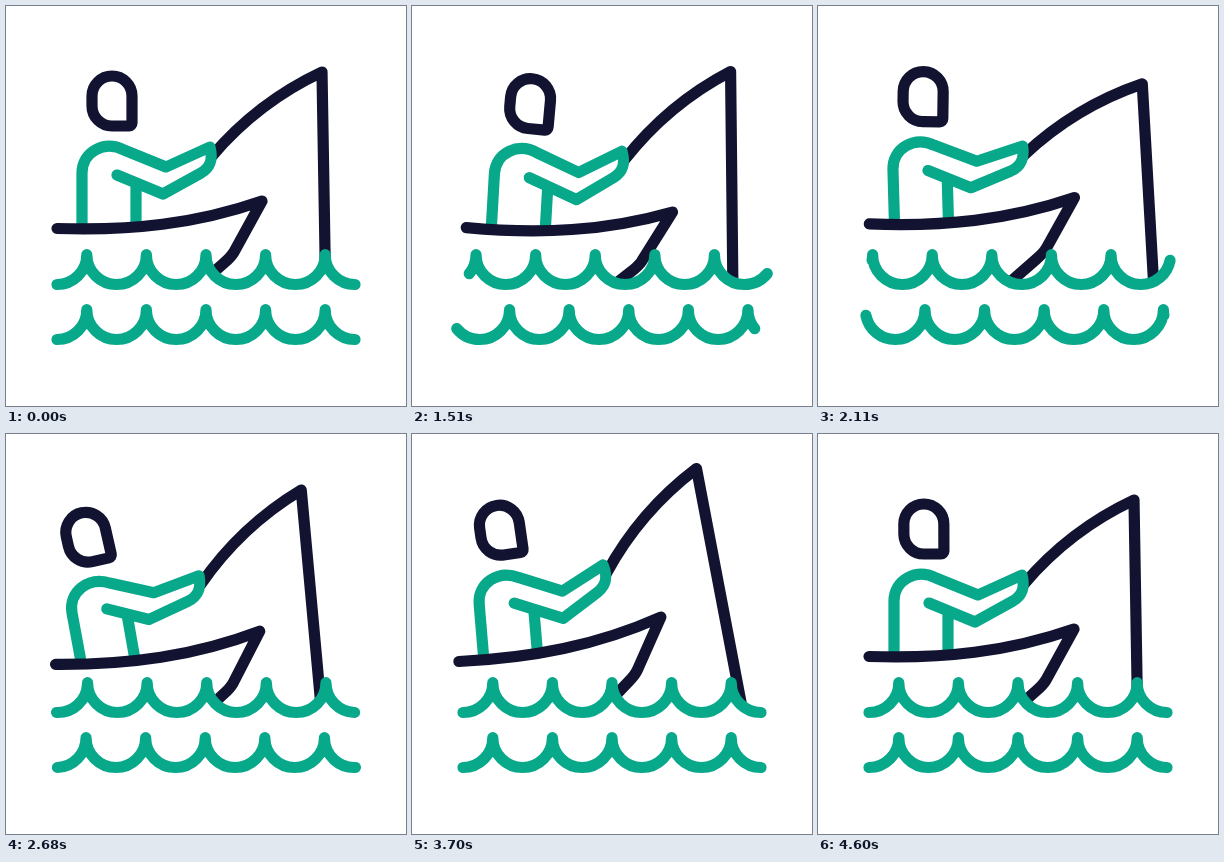
An HTML page with a canvas for the animation above (4.63 s loop, 400 px wide and 400 px high).

```html
<!DOCTYPE html>
<html lang="en">
<head>
<meta charset="utf-8">
<title>Fishing</title>
<style>
html, body { margin: 0; width: 100%; height: 100%; overflow: hidden; background: #fff; }
canvas { display: block; width: 400px; height: 400px; }
</style>
</head>
<body>
<canvas id="stage"></canvas>
<script>
const canvas = document.getElementById('stage');
const ctx = canvas.getContext('2d');
const dpr = window.devicePixelRatio || 1;
canvas.width = canvas.height = 400 * dpr;

const NAVY = '#121331', GREEN = '#08a88a';
const LOOP = 4630, HOLD = 1000, MOVE = 3600, STEP = 30;
const R = 29.8, SURFACE = 278.5;

// Eased motion from rest through a few [time, value] turning points back to rest.
function swing(t, ...turns) {
  let [t0, v0] = [0, 0];
  for (const [t1, v1] of [...turns, [MOVE, 0]]) {
    if (t <= t1) {
      const s = Math.max(0, t - t0) / (t1 - t0);
      return v0 + (v1 - v0) * s * s * (3 - 2 * s);
    }
    [t0, v0] = [t1, v1];
  }
  return 0;
}

const tiltAt = t => 4.8 * swing(t, [810, 1], [1440, -1], [2060, 1], [2670, -1]);
const bobAt = t => swing(t, [540, 5], [1110, -4], [1680, 5], [2380, -4.5]);
const leanAt = t => swing(t, [900, 0], [1600, -8.5], [2150, 0]);
const rodAt = t => swing(t, [380, -4.5], [960, 11.5], [1460, -12.5], [2070, 9.8], [2670, -12]);
const driftAt = t => swing(t, [380, 0], [1110, 16], [1800, -6], [2620, 11]);

// Same curve as cubic-bezier(.5, 0, .5, 1).
function ease(x) {
  let lo = 0, hi = 1;
  for (let i = 0; i < 24; i++) {
    const s = (lo + hi) / 2;
    if (1.5 * s * (1 - s) + s * s * s < x) lo = s; else hi = s;
  }
  return lo * lo * (3 - 2 * lo);
}

function rotate([x, y], [px, py], degrees) {
  const a = degrees * Math.PI / 180, c = Math.cos(a), s = Math.sin(a);
  return [px + (x - px) * c - (y - py) * s, py + (x - px) * s + (y - py) * c];
}

const moveTo = p => ctx.moveTo(...p);
const lineTo = p => ctx.lineTo(...p);
const quadTo = (c, p) => ctx.quadraticCurveTo(...c, ...p);
const cubicTo = (a, b, p) => ctx.bezierCurveTo(...a, ...b, ...p);

function stroke(color, trace) {
  ctx.beginPath();
  trace();
  ctx.strokeStyle = color;
  ctx.stroke();
}

// Chain of half circles; positions count quarter arcs, 0 being a trough.
function traceWave(shift, from, to, y) {
  const left = 51 - R * shift;
  for (let k = Math.floor((from + 1) / 2); 2 * k - 1 < to; k++) {
    const a = Math.max(from - 2 * k, -1), b = Math.min(to - 2 * k, 1);
    ctx.arc(left + 2 * R * k, y - R, R, (1 - a) * Math.PI / 2, (1 - b) * Math.PI / 2, true);
  }
}

function drawHead([x, y], angle) {
  ctx.save();
  ctx.translate(x, y);
  ctx.rotate(angle * Math.PI / 180);
  stroke(NAVY, () => {
    ctx.moveTo(0, 25);
    ctx.arc(0, 5, 20, Math.PI / 2, Math.PI);
    ctx.arc(0, -5, 20, Math.PI, 0);
    ctx.arcTo(20, 25, 0, 25, 3);
    ctx.closePath();
  });
  ctx.restore();
}

function drawAngler(t) {
  const tilt = tiltAt(t), bob = bobAt(t), lean = leanAt(t), rod = rodAt(t);
  const nod = 0.8 * tiltAt(t - 120);
  const arm = 0.7 * rod - lean;

  const boat = (x, y) => {
    const p = rotate([x, y], [153.5, 276], tilt);
    return [p[0], p[1] + bob];
  };
  const torso = (x, y) => boat(...rotate([x, y], [103, 220], lean));
  const elbow = torso(160, 161);
  const forearm = (x, y) =>
    rotate([elbow[0] + x - 160, elbow[1] + y - 161], elbow, arm);
  const grip = forearm(206, 150);
  const onRod = (x, y) => rotate([grip[0] + x, grip[1] + y], grip, rod);

  stroke(NAVY, () => {
    moveTo(grip);
    quadTo(onRod(46, -54), onRod(110, -84));
    ctx.lineTo(319.5 + driftAt(t), 275);
  });

  drawHead(torso(...rotate([106, 95], [106, 145], nod)), tilt + lean + nod);

  stroke(GREEN, () => {
    moveTo(boat(76, 217));
    lineTo(torso(76, 167));
    cubicTo(torso(76, 146), torso(98, 134), torso(118, 144));
    lineTo(elbow);
    lineTo(forearm(204, 141));
    cubicTo(forearm(207, 153), forearm(205, 161), forearm(195, 167));
    lineTo(forearm(157, 188));
    lineTo(torso(111, 169));
    moveTo(torso(130, 179));
    lineTo(boat(130, 216));
  });

  stroke(NAVY, () => {
    moveTo(boat(51, 222.5));
    cubicTo(boat(125, 225), boat(190, 218), boat(256, 195));
    lineTo(boat(228, 246));
    quadTo(boat(225, 251), boat(218, 257));
    lineTo(boat(192, 280));
  });
}

function drawWater(t) {
  const half = MOVE / 2;
  const shift = 4 * ease(Math.min(t, MOVE - t) / half);

  // The water hides whatever is below the surface.
  ctx.beginPath();
  traceWave(shift, shift - 2, shift + 12, SURFACE);
  ctx.lineTo(420, 400);
  ctx.lineTo(-20, 400);
  ctx.fill();

  stroke(GREEN, () => traceWave(shift, shift, shift + 10, SURFACE));
  ctx.translate(400, 0);
  ctx.scale(-1, 1);
  stroke(GREEN, () => traceWave(shift, shift, shift + 10, SURFACE + 55));
}

function drawScene(t) {
  ctx.setTransform(dpr, 0, 0, dpr, 0, 0);
  ctx.fillStyle = '#fff';
  ctx.fillRect(0, 0, 400, 400);
  ctx.lineWidth = 11.2;
  ctx.lineCap = ctx.lineJoin = 'round';
  drawAngler(t);
  drawWater(t);
}

const start = performance.now();
function tick() {
  const time = (performance.now() - start) % LOOP;
  const moved = Math.floor((time - HOLD) / STEP) * STEP;
  drawScene(Math.min(MOVE, Math.max(0, moved)));
  requestAnimationFrame(tick);
}
tick();
</script>
</body>
</html>
```
